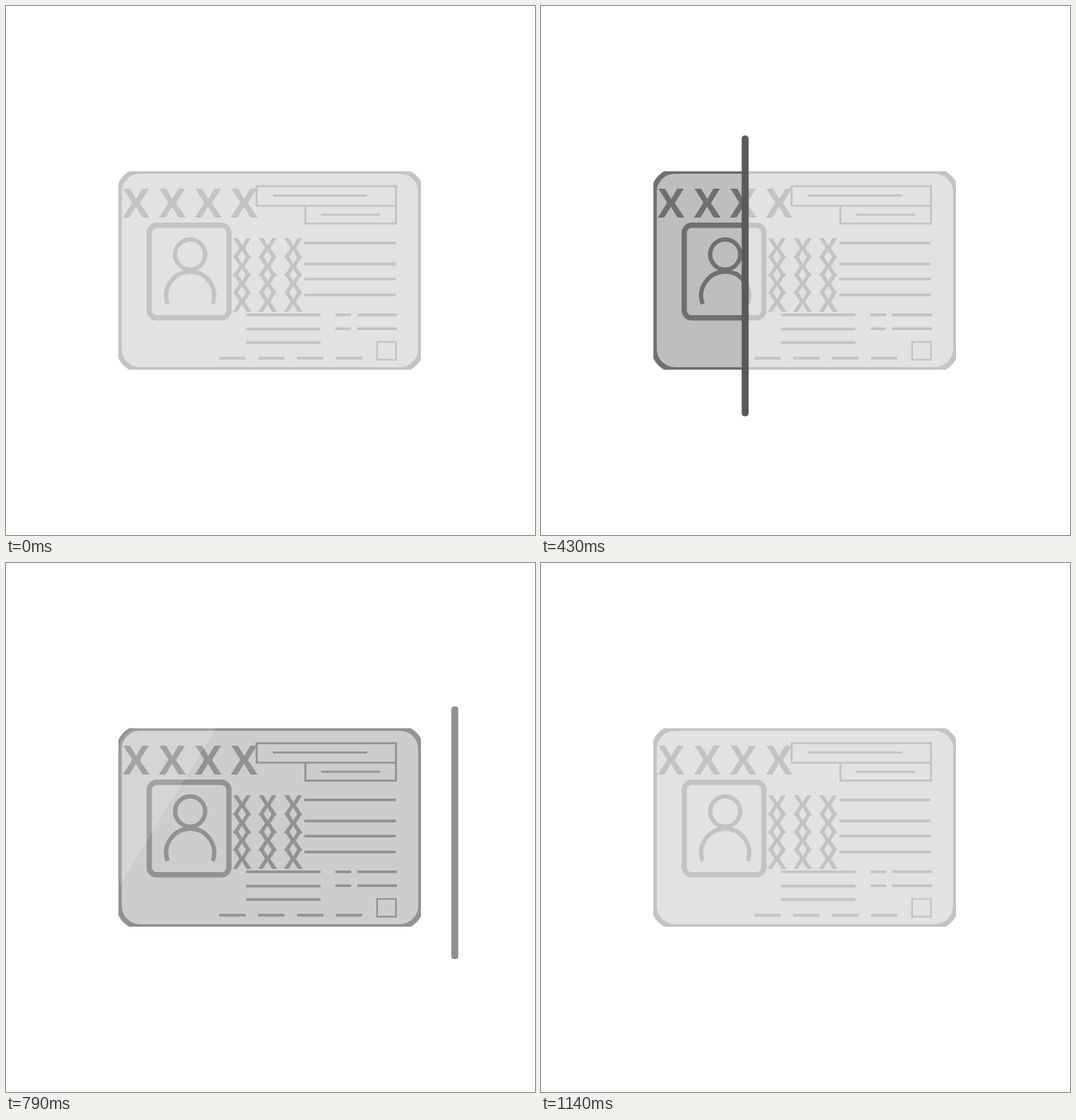
These frames come from a looping animation (640x640 px, 1.28 s). An HTML page:

```html
<!DOCTYPE html>
<html lang="en">
<head>
<meta charset="utf-8">
<title>Card scan</title>
<style>
  html, body { margin: 0; height: 100%; overflow: hidden; background: #fff; }
  svg { display: block; width: 100vw; height: 100vh; }
  text { font-family: "Open Sans", "Noto Sans", sans-serif; font-weight: 700; text-anchor: middle; }
  .light { color: #c3c3c3; --paper: #e2e2e2; }
  .dark { color: #707070; --paper: #bebebe; }
</style>
</head>
<body>
<svg viewBox="0 0 640 640">
  <defs>
    <clipPath id="bounds"><rect x="136" y="200" width="366" height="240"/></clipPath>
    <clipPath id="scanned"><rect id="swept" y="0" width="0" height="640"/></clipPath>
    <clipPath id="outline"><rect x="137" y="200" width="364.7" height="240" rx="25"/></clipPath>
    <g id="card" clip-path="url(#bounds)" fill="none" stroke="currentColor">
      <rect x="137" y="200" width="364.7" height="240" rx="25" stroke-width="6.2" style="fill: var(--paper)"/>
      <g id="letters" fill="currentColor" stroke="none"></g>
      <path stroke-width="2.4" d="M303.2 218H471.8V241.6H303.2ZM362.2 241.6H471.8V263.2H362.2ZM323 229.3H437M381 252.5H452.5"/>
      <rect x="173.3" y="265.3" width="96.4" height="112" rx="9" stroke-width="6.4"/>
      <g stroke-width="5.2">
        <circle cx="222.8" cy="300.6" r="18.2"/>
        <path d="M195.6 360.5A29 29 0 1 1 250 360.5"/>
      </g>
      <path stroke-width="3.2" d="M361 286.6H471.5M361 312.2H471.5M361 330.3H471.5M361 349.6H471.5
        M290.5 373.6H380.5M290.5 390.8H380.5M290.5 407.2H380.5
        M398.5 373.6H417.5M425 373.6H473M398.5 390.4H417.5M425 390.4H473
        M258 426.2H290M305 426.2H337M352 426.2H384M399 426.2H431"/>
      <rect x="449" y="406.4" width="22.8" height="21.4" stroke-width="2"/>
    </g>
  </defs>
  <use href="#card" class="light"/>
  <g clip-path="url(#scanned)"><use id="dark" href="#card" class="dark"/></g>
  <g clip-path="url(#bounds)"><g clip-path="url(#outline)">
    <path id="shine" d="M0 200H188L41 440H-147Z" fill="#fff" opacity=".15"/>
  </g></g>
  <rect id="bar" x="-4.25" y="-170" width="8.5" height="340" rx="4.25" fill="#5a5a5a"/>
</svg>
<script>
const $ = id => document.getElementById(id);
const LOOP = 1280, FPS = 14, MIDDLE = 7;

const letter = (x, y, size) => `<text x="${x}" y="${y}" font-size="${size}">X</text>`;
let letters = "";
for (let i = 0; i < 4; i++) {
  letters += letter(157.5 + i * 43.6, 256, 48.5);
  for (let j = 0; j < 3; j++) letters += letter(285.7 + j * 31, 305.3 + i * 21.5, 34);
}
$("letters").innerHTML = letters;

// Bar distance from the centre, by steps away from the middle of the sweep
const reach = [0, 73, 126, 174, 223, 269.5, 293, 295];
// Opacities by step
const barAlpha = [0, .25, .65, .92, 1, 1, 1, 1, 1, .98, .89, .67, .39, .14];
const darkFade = [.98, .83, .58, .29, .1];

function draw(ms) {
  // Steps start on whole hundredths of a second
  let step = Math.floor(ms * FPS / 1000) + 1;
  while (Math.round(step * 100 / FPS) * 10 > ms) step--;

  const away = step - MIDDLE;
  const x = 320 + Math.sign(away) * reach[Math.min(Math.abs(away), 7)];
  const alpha = barAlpha[step] ?? 0;
  const height = 1 - .38 * (1 - alpha) ** 1.2;
  $("bar").setAttribute("transform", `translate(${x} 326.4) scale(1 ${height})`);
  $("bar").setAttribute("opacity", alpha);
  $("swept").setAttribute("width", x);
  $("dark").setAttribute("opacity", step < 9 ? 1 : darkFade[step - 9] ?? 0);
  $("shine").setAttribute("transform", `translate(${190 + 124 * (step - 12)} 0)`);
}

function tick() {
  draw(performance.now() % LOOP);
  requestAnimationFrame(tick);
}
tick();
</script>
</body>
</html>
```
